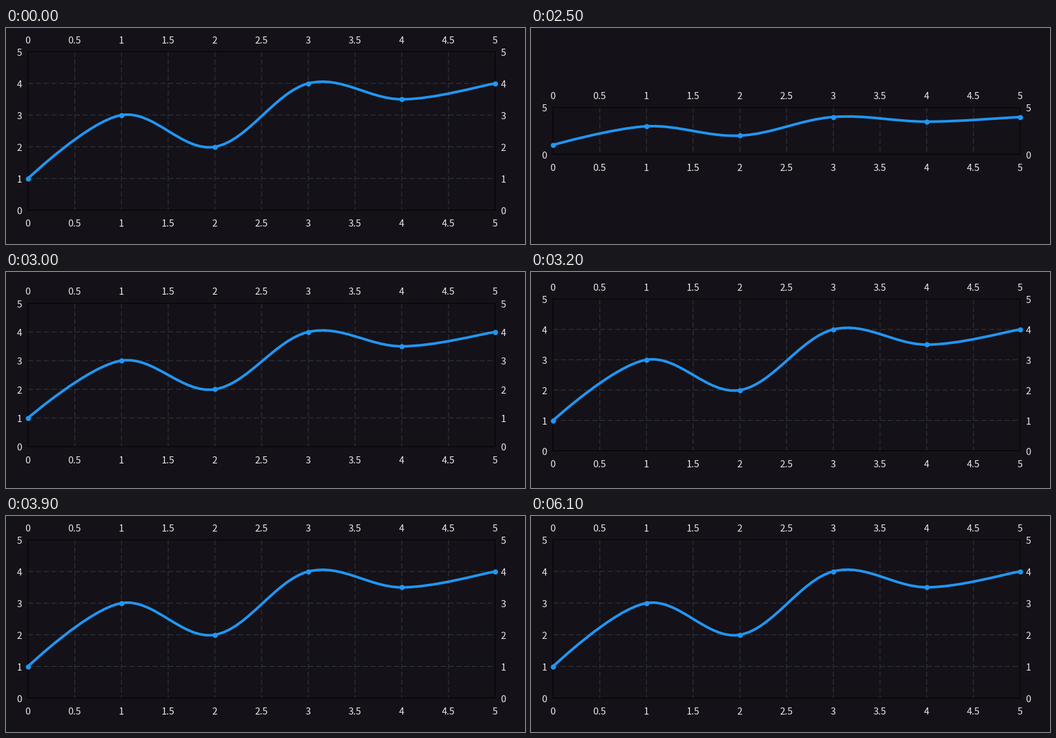
Animation of 800 by 334 pixels, one loop 6200 ms. Source, as a matplotlib script:

```python
import math

import matplotlib.pyplot as plt
import numpy as np
from matplotlib.animation import FuncAnimation
from matplotlib.patches import PathPatch, Rectangle
from matplotlib.path import Path

W, H, DPI = 800, 334, 100
PX = 72 / DPI  # points per pixel
STEP_MS, LOOP_MS = 100, 6200

BACK, GRID, BORDER = "#141218", "#323b41", "#000000"
BLUE, TEXT = "#2196f3", "#ece7ec"

LEFT, RIGHT = 34, 754
MID, HALF = 159.2, 122.5
SPAN = 5
HIDE_MS, GROW_MS, TAU = 2000, 2413, 250

SPOTS = np.array([(0, 1), (1, 3), (2, 2), (3, 4), (4, 3.5), (5, 4)])
SMOOTH = 0.35
FONT = dict(family="Noto Sans CJK JP", size=14.6 * PX, color=TEXT,
            ha="center", va="baseline")

fig = plt.figure(figsize=(W / DPI, H / DPI), dpi=DPI, facecolor=BACK)
ax = fig.add_axes([0, 0, 1, 1])


def half_height(t):
    """Half of the plot height at time t, or 0 while the chart is hidden."""
    if t < HIDE_MS:
        return HALF
    if t < GROW_MS:
        return 0
    return HALF * (1 - math.exp((GROW_MS - t) / TAU))


def nice_step(size):
    """Tick distance that leaves about 40 px between labels."""
    raw = SPAN / max(size // 40, 1)
    unit = 10 ** math.floor(math.log10(raw))
    scaled = raw / unit
    for limit, step in ((7.6, 10), (2.6, 5), (1.6, 2)):
        if scaled >= limit:
            return step * unit
    return unit


def ticks(size):
    inner = np.arange(0, SPAN - 1e-6, nice_step(size))
    return [*inner, SPAN]


def smooth_path(pts):
    """Cubic path whose tangents follow the neighbouring points."""
    verts, bend = [pts[0]], np.zeros(2)
    for i in range(1, len(pts)):
        prev, cur = pts[i - 1], pts[i]
        after = pts[min(i + 1, len(pts) - 1)]
        start = prev + bend
        bend = (after - prev) / 2 * SMOOTH
        verts += [start, cur - bend, cur]
    return Path(verts, [Path.MOVETO] + [Path.CURVE4] * (len(verts) - 1))


def label(x, y, value):
    ax.text(x - 0.4, y + 5.4, f"{value:g}", **FONT)


def dashes(xs, ys):
    ax.plot(xs, ys, color=GRID, lw=PX, ls=(0, (8, 4)), snap=False, zorder=1)


def draw(k):
    ax.clear()
    ax.set_xlim(0, W)
    ax.set_ylim(H, 0)
    ax.axis("off")

    half = half_height(k * STEP_MS)
    if half <= 0:
        return
    top, bottom = MID - half, MID + half

    def px(v):
        return LEFT + (RIGHT - LEFT) * v / SPAN

    def py(v):
        return bottom - 2 * half * v / SPAN

    for v in ticks(RIGHT - LEFT):
        x = px(v)
        label(x, top - 18.4, v)
        label(x, bottom + 20.4, v)
        if 0 < v < SPAN:
            dashes([x, x], [top, bottom])
    for v in ticks(2 * half):
        y = py(v)
        label(LEFT - 13, y + 0.9, v)
        label(RIGHT + 13.2, y + 0.9, v)
        if 0 < v < SPAN:
            dashes([LEFT, RIGHT], [y, y])

    ax.add_patch(Rectangle((LEFT, top), RIGHT - LEFT, 2 * half, fill=False,
                           ec=BORDER, lw=PX, snap=False, zorder=2))
    pts = np.column_stack([px(SPOTS[:, 0]), py(SPOTS[:, 1])])
    ax.add_patch(PathPatch(smooth_path(pts), fill=False, ec=BLUE, lw=4 * PX,
                           capstyle="butt", snap=False, zorder=3))
    ax.plot(*pts.T, "o", color=BLUE, ms=8 * PX, mew=0, snap=False, zorder=4)


anim = FuncAnimation(fig, draw, frames=LOOP_MS // STEP_MS, interval=STEP_MS,
                     init_func=lambda: None, repeat=True, repeat_delay=0)
plt.show()
```
